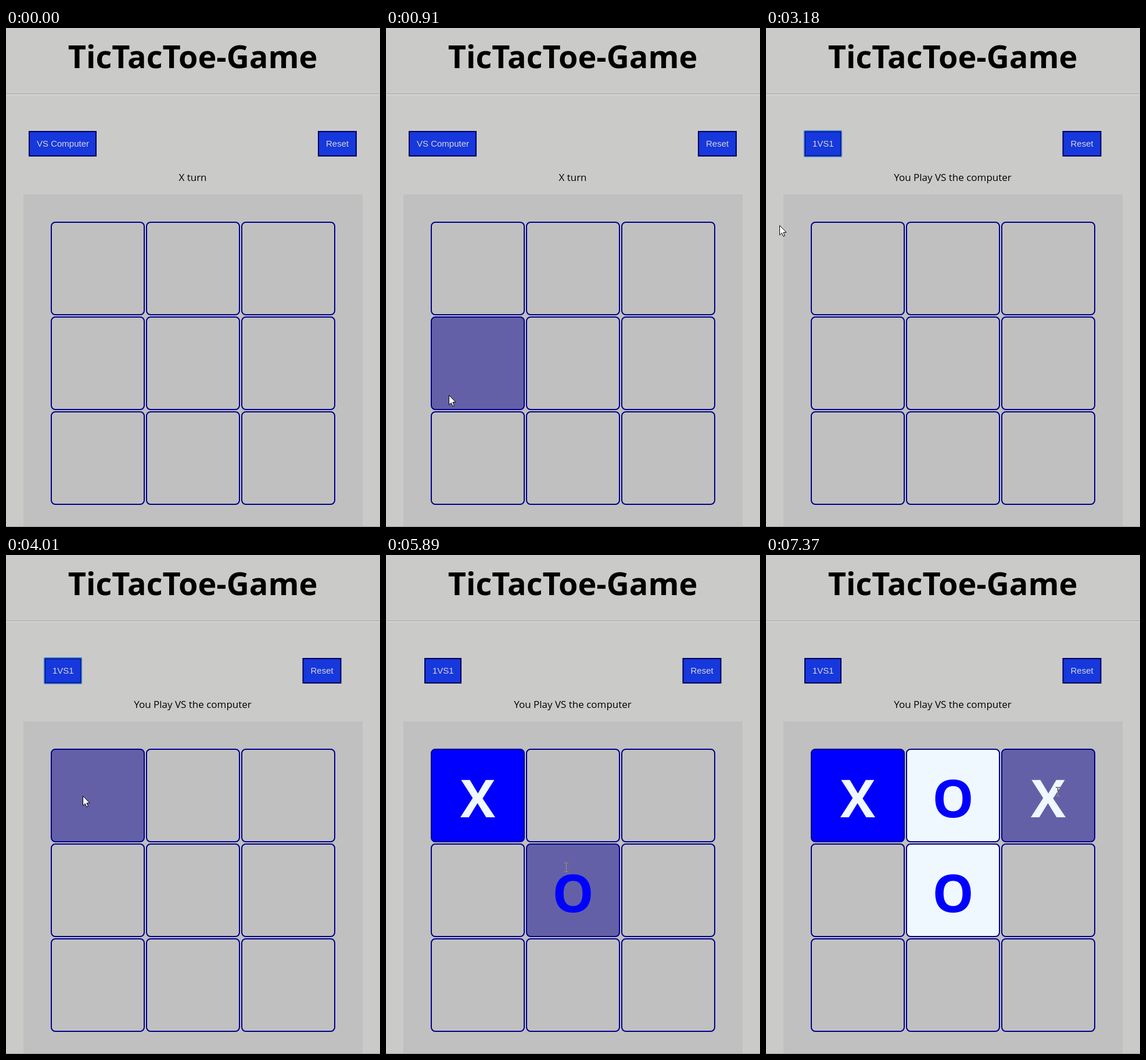
Write an HTML page that moves like this. It is 644 px wide and 858 px high and loops after 8 s.

```html
<!DOCTYPE html>
<html lang="en">
<head>
<meta charset="utf-8">
<title>TicTacToe-Game</title>
<style>
  html, body { margin: 0; width: 100%; height: 100%; overflow: hidden; background: #cacac8; }
  svg { display: block; }
  text { font-family: "Open Sans", "Noto Sans", sans-serif; text-anchor: middle; }
  .button rect { fill: #1638dc; stroke: #000058; stroke-width: 2; }
  .button text { font: 15px "Liberation Sans", Arial, sans-serif; fill: #d6d8dc; text-anchor: start; }
  .cell rect { stroke: #00008b; stroke-width: 2; }
  .cell text { font-size: 90px; font-weight: 700; }
  #ring { fill: none; stroke: #2f74d8; stroke-width: 2; }
  #beam { fill: none; stroke: #fff; mix-blend-mode: difference; }
</style>
</head>
<body>
<svg id="stage" width="644" height="858" viewBox="0 0 644 858">
  <rect width="644" height="858" fill="#cacac8"/>
  <text x="321.5" y="69" font-size="54" font-weight="700">TicTacToe-Game</text>
  <path d="M0 113.5H644" stroke="#9a9a9a"/>
  <path d="M0 114.5H644" stroke="#ececec"/>
  <g class="button" id="mode"><rect x="1" y="1" height="42"/><text x="14" y="27"></text></g>
  <g class="button" id="reset"><rect x="1" y="1" width="65" height="42"/><text x="14" y="27">Reset</text></g>
  <rect id="ring" y="177" height="44" rx="1"/>
  <text id="status" x="321.5" y="263" font-size="17"></text>
  <rect x="30" y="286" width="584" height="571" fill="#c0c0c0"/>
  <path d="M0 857.5H644" stroke="#9a9a9a"/>
  <g id="board"></g>
  <path id="arrow" d="M.5 .5V17L4.3 13.4L6.8 19.3L9.4 18.2L7 12.4H12Z" fill="#fff" stroke="#000"/>
  <path id="beam" d="M-3.5 -7.5H-1L0 -7L1 -7.5H3.5M0 -7V7M-3.5 7.5H-1L0 7L1 7.5H3.5"/>
  <circle id="press" r="15" fill="#ff0" fill-opacity=".47"/>
</svg>
<script>
const LOOP = 8000, SWITCH = 2410;
const $ = id => document.getElementById(id);

// Pointer moves: start, end, number of steps, evenly timed path points
const moves = [
  [530, 990, 7, [[330, 838], [240, 735], [130, 644], [88, 620]]],
  [1290, 2020, 10, [[92, 590], [100, 470], [75, 300], [86, 193]]],
  [3030, 3320, 5, [[74, 225], [24, 340], [48, 418]]],
  [3550, 4010, 7, [[62, 420], [105, 428], [133, 415]]],
  [5340, 6120, 11, [[133, 415], [133, 415], [205, 450], [294, 514], [322, 558], [326, 564]]],
  [6210, 6820, 9, [[334, 552], [366, 512], [402, 470], [462, 414], [500, 406]]]
];
const presses = [[2310, SWITCH], [4560, 5340], [6990, 7140]];
const marks = [[0, "X", 5340], [4, "O", 5570], [2, "X", 7140], [1, "O", 7370]];

const cells = Array.from({ length: 9 }, (_, i) => {
  const x = 77 + i % 3 * 164, y = 333 + Math.floor(i / 3) * 163;
  $("board").insertAdjacentHTML("beforeend",
    `<g class="cell"><rect x="${x + 1}" y="${y + 1}" width="160" height="159" rx="7"/>` +
    `<text x="${x + 81}" y="${y + 118}"></text></g>`);
  const [box, label] = $("board").lastChild.children;
  return { x, y, box, label };
});

const show = (el, on) => el.setAttribute("visibility", on ? "visible" : "hidden");
const place = (el, x, y) => el.setAttribute("transform", `translate(${x} ${y})`);
const within = (t, [from, to]) => t >= from && t < to;

function pointerAt(t) {
  const move = moves.filter(m => t >= m[0]).pop();
  if (!move) return null;
  const [start, end, steps, path] = move;
  const step = Math.min(steps - 1, Math.floor((t - start) / (end - start) * (steps - 1) + 0.1));
  const at = step / (steps - 1) * (path.length - 1);
  const i = Math.min(Math.floor(at), path.length - 2);
  return path[i].map((v, k) => v + (path[i + 1][k] - v) * (at - i));
}

function drawControls(t) {
  const solo = t >= SWITCH;
  const left = solo ? 66 : 39, width = solo ? 64 : 117;
  const [box, label] = $("mode").children;
  place($("mode"), left, 177);
  place($("reset"), solo ? 510.5 : 537, 177);
  box.setAttribute("width", width - 2);
  label.textContent = solo ? "1VS1" : "VS Computer";
  $("status").textContent = solo ? "You Play VS the computer" : "X turn";
  $("ring").setAttribute("x", left);
  $("ring").setAttribute("width", width);
  show($("ring"), within(t, [2310, 4560]));
}

function draw(t) {
  drawControls(t);
  const pointer = pointerAt(t);
  const [px, py] = pointer || [-99, -99];
  let overText = false;

  cells.forEach(({ x, y, box, label }, i) => {
    const mark = marks.find(m => m[0] === i && t >= m[2]);
    const sign = mark ? mark[1] : "";
    const hover = px >= x && px < x + 162 && py >= y && py < y + 161;
    const base = { X: "#0000ff", O: "#f0f8ff" }[sign] || "#c0c0c0";
    box.setAttribute("fill", hover ? "#6460a8" : base);
    label.setAttribute("fill", sign === "X" ? "#f0f8ff" : "#0000ff");
    label.textContent = sign;
    if (sign && Math.abs(px - x - 81) < 33 && Math.abs(py - y - 86) < 60) overText = true;
  });

  place($("arrow"), Math.round(px) - 1, Math.round(py) - 1);
  place($("beam"), Math.round(px) + 2.5, Math.round(py) + 1);
  place($("press"), px, py);
  show($("arrow"), pointer && !overText);
  show($("beam"), overText);
  show($("press"), presses.some(p => within(t, p)));
}

const began = performance.now();
function tick() {
  draw((performance.now() - began) % LOOP);
  requestAnimationFrame(tick);
}
tick();
</script>
</body>
</html>
```
